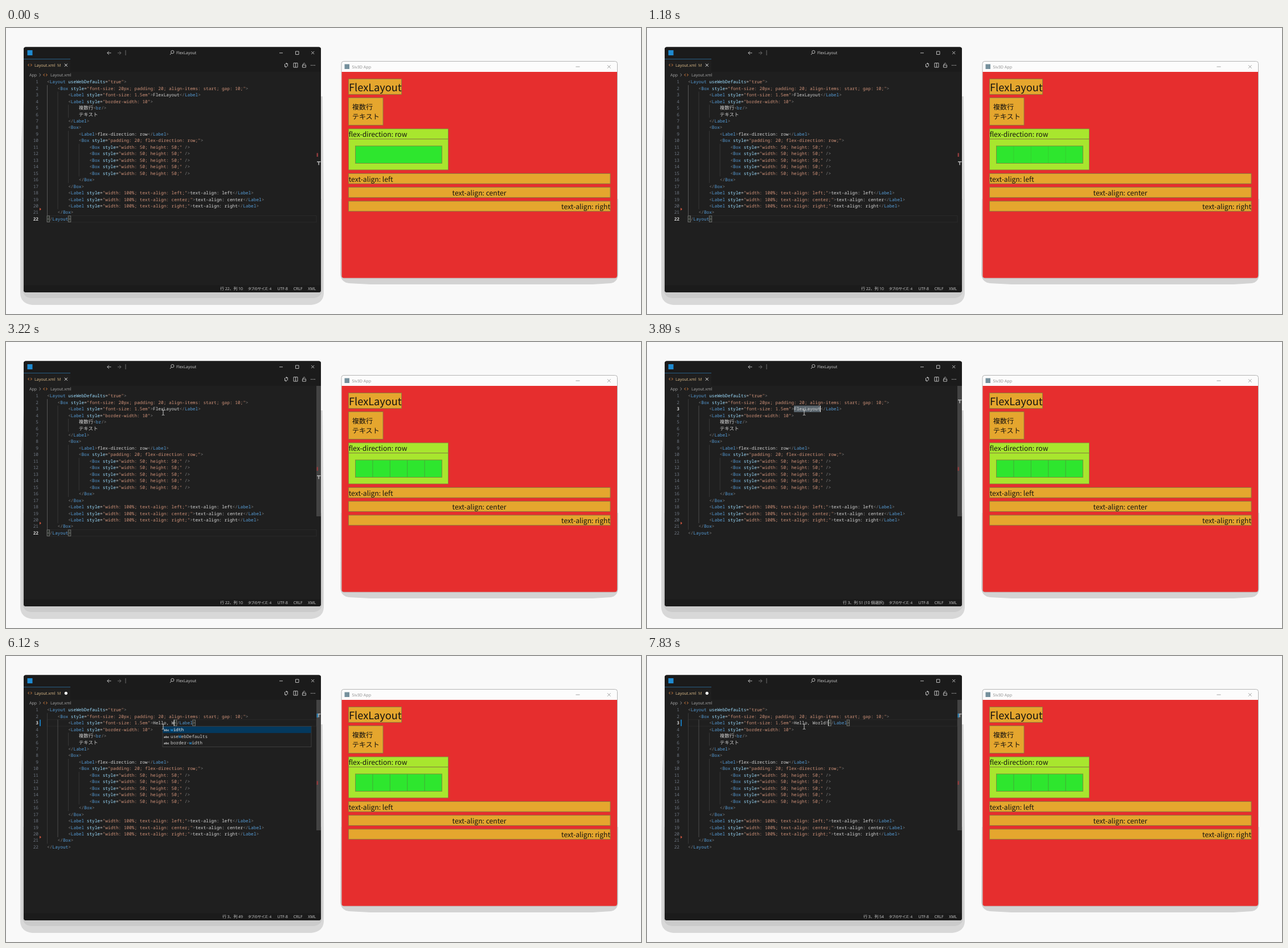
These frames come from a looping animation (1115 by 502 pixels, 8000 ms). An HTML page:

```html
<!DOCTYPE html>
<html lang="ja">
<head>
<meta charset="utf-8">
<title>FlexLayout</title>
<style>
html, body { margin: 0; width: 100%; height: 100%; overflow: hidden; background: #f9f9f9; }
svg { display: block; width: 1115px; height: 502px; }
text { white-space: pre; text-rendering: geometricPrecision; }
.code { font: 7.75px "Noto Sans Mono", monospace; fill: #ccc; }
.jp { font: 8.46px "Noto Sans CJK JP", "Noto Sans CJK", sans-serif; }
.ui { font: 7.1px "Open Sans", "Noto Sans CJK JP", sans-serif; fill: #ccc; }
.bar { font: 6.9px "Open Sans", "Noto Sans CJK JP", sans-serif; fill: #d0d0d0; }
.kana { font-size: 6.3px; font-feature-settings: "palt"; }
.app { font: 12.15px "Noto Sans CJK JP", "Noto Sans CJK", sans-serif; fill: #161310; }
.big { font-size: 18.2px; }
.icon { fill: none; stroke: #ccc; stroke-width: .9; }
</style>
</head>
<body>
<svg id="stage" viewBox="0 0 1115 502"></svg>
<script>
const LOOP = 8000, LEFT = 72, CH = 4.65, ROW = 11.46, TOP = 94.5;
const stage = document.getElementById('stage');

function el(name, attrs, parent = stage) {
  const node = document.createElementNS('http://www.w3.org/2000/svg', name);
  for (const k in attrs) node.setAttribute(k, attrs[k]);
  return parent.appendChild(node);
}
const group = () => el('g', {});
const rect = (x, y, x2, y2, fill, more, parent) =>
  el('rect', { x, y, width: x2 - x, height: y2 - y, fill, ...more }, parent);
const path = (d, more, parent) => el('path', { d, class: 'icon', ...more }, parent);
function text(x, y, str, cls, more, parent) {
  const node = el('text', { x, y, class: cls, ...more }, parent);
  node.textContent = str;
  return node;
}
const show = (node, on) => node.setAttribute('visibility', on ? 'visible' : 'hidden');
const colX = c => LEFT + c * CH;
const rowY = n => TOP + (n - 1) * ROW;

// Editor window
path('M31 120 L27 200 L25 330 V466 Q26 484 46 486 H536 Q557 484 558 466 V300 L556 120Z',
  { style: 'fill:#d8d8d8;stroke:none' });
path('M30 300 L28 455 Q29 473 44 474 H540 Q555 473 556 456 L554 300Z',
  { style: 'fill:#cbcbcb;stroke:none' });
rect(31, 33.5, 553, 464, '#1f1f1f', { rx: 4 });
path('M31 76.5 V37.5 Q31 33.5 35 33.5 H549 Q553 33.5 553 37.5 V76.5Z',
  { style: 'fill:#1b1b1b;stroke:none' });
rect(31, 54, 113, 77, '#1f1f1f');
rect(31, 54, 113, 54.8, '#2a6f9f');
path('M31 451.5 H553 V460 Q553 464 549 464 H35 Q31 464 31 460Z',
  { style: 'fill:#1b1b1b;stroke:none' });
rect(37.5, 39, 46.5, 48, '#1f8ad0');

path('M184.5 43.8 H177.8 M180.8 40.8 L177.8 43.8 L180.8 46.8');
path('M196 43.8 H202 M199 40.8 L202 43.8 L199 46.8 M210 39 V48', { style: 'stroke:#777' });
path('M294.9 42.1 A2.6 2.6 0 1 1 289.7 42.1 A2.6 2.6 0 1 1 294.9 42.1 M290.4 44 L288 47');
text(299, 46.4, 'FlexLayout', 'ui');
path('M480 43.8 H486 M508.5 41 H514 V46.5 H508.5Z M536.2 41 L541.2 46 M541.2 41 L536.2 46');

const tagIcon = (x, y) => path(
  `M${x - 1} ${y - 2} L${x - 3.5} ${y} L${x - 1} ${y + 2} M${x + 1} ${y - 2} L${x + 3.5} ${y} L${x + 1} ${y + 2}`,
  { style: 'stroke:#d9803f' });
tagIcon(42, 65);
text(50, 67.9, 'Layout.xml', 'ui', { style: 'fill:#e2c08d' });
text(90, 67.9, 'M', 'ui', { style: 'fill:#c5a878' });
const closeTab = path('M102.8 62.7 L107.8 67.7 M107.8 62.7 L102.8 67.7', { style: 'stroke:#fff' });
const dirtyDot = el('circle', { cx: 105.3, cy: 65.3, r: 2.6, fill: '#fff' });

path('M489.5 63 V68 H492 M494.5 67.5 V62.5 H491.5 M493 61 L491.2 62.5 L493 64 M491 66.5 L492.8 68 L491 69.5');
path('M505 61.5 H512 V69 H505Z M508.5 61.5 V69');
path('M520.5 65 H526.5 V69 H520.5Z M521.7 65 V63 Q523.5 60 525.4 63');
for (const x of [536, 539, 542]) el('circle', { cx: x, cy: 65.5, r: .75, fill: '#ccc' });

const crumb = { style: 'fill:#a9a9a9' };
text(41, 84.8, 'App', 'ui', crumb);
path('M58.5 80 L61 82.4 L58.5 84.8', { style: 'stroke:#999' });
tagIcon(69, 82.4);
text(78, 84.8, 'Layout.xml', 'ui', crumb);

const end = { 'text-anchor': 'end' };
const status = text(416, 460.3, '', 'bar', end);
text(466, 460.3, 'タブのサイズ: 4', 'bar kana', end);
text(495, 460.3, 'UTF-8', 'bar', end);
text(520.5, 460.3, 'CRLF', 'bar', end);
text(544, 460.3, 'XML', 'bar', end);

// Code
const item = '<Box style="width: 50; height: 50;" />';
const align = a => `<Label style="width: 100%; text-align: ${a};">text-align: ${a}</Label>`;
const head = '<Label style="font-size: 1.5em">';
const source = [
  [0, '<Layout useWebDefaults="true">'],
  [1, '<Box style="font-size: 20px; padding: 20; align-items: start; gap: 10;">'],
  [2, ''],
  [2, '<Label style="border-width: 10">'],
  [3, '複数行<br/>'],
  [3, 'テキスト'],
  [2, '</Label>'],
  [2, '<Box>'],
  [3, '<Label>flex-direction: row</Label>'],
  [3, '<Box style="padding: 20; flex-direction: row;">'],
  ...Array(5).fill([4, item]),
  [3, '</Box>'],
  [2, '</Box>'],
  [2, align('left')], [2, align('center')], [2, align('right')],
  [1, '</Box>'],
  [0, '</Layout>']
];
const TOKEN = /(<\/?|\/?>)|((?<=<\/?)\w+)|(\w+(?=="))|("[^"]*")|(=|\s+|[^<>=]+)/g;
const COLORS = ['#808080', '#569cd6', '#9cdcfe', '#ce9178', '#d4d4d4'];

function paint(node, line) {
  node.textContent = '';
  for (const m of line.matchAll(TOKEN)) {
    const span = el('tspan', { fill: COLORS[m.slice(1).findIndex(Boolean)] }, node);
    if (/[\u3040-\u9fff]/.test(m[0])) span.setAttribute('class', 'jp');
    span.textContent = m[0];
  }
}

const lineBox = rect(LEFT, 0, 545, ROW, 'none', { stroke: '#2b2b2b', 'stroke-width': .9 });
const guide = (indent, a, b) => rect(colX(indent * 4), rowY(a) - ROW / 2,
  colX(indent * 4) + .7, rowY(b) + ROW / 2, '#424242');
const outer = guide(0, 2, 21), inner = guide(1, 3, 20);
guide(2, 5, 6); guide(2, 9, 16); guide(3, 11, 15);

const selection = rect(colX(40), rowY(3) - 5.7, colX(50), rowY(3) + 5.7, '#5a656d');
const marks = [0, 1].map(() =>
  rect(0, 0, CH, ROW - .8, '#2b302b', { stroke: '#888', 'stroke-width': .7 }));
const numbers = [], lines = [];
source.forEach(([indent, str], i) => {
  const y = rowY(i + 1) + 2.75;
  numbers.push(text(57, y, i + 1, 'code', end));
  lines.push(text(colX(indent * 4), y, '', 'code'));
  paint(lines[i], str);
});
path('M59 315.5 L62 318 L59 320.5Z', { style: 'fill:#c8533d;stroke:none' });
const changed = rect(59, rowY(3) - 5.7, 61, rowY(3) + 5.7, '#1878b8');
const caret = rect(0, 0, 1, ROW - .4, '#e4e4e4');

// Scroll bar with overview marks
const slider = rect(545, 77, 553, 306, '#797979', { opacity: 0 });
rect(545.5, 219.5, 548, 226, '#8e3a3c');
const ruler = group();
rect(546, 0, 552.5, 1.6, '#b0b0b0', {}, ruler);
rect(548.4, 0, 550, 6.5, '#b0b0b0', {}, ruler);
const rulerEdit = rect(545.5, 101, 548, 108, '#2d7fb0');

// Suggestions
const popup = group();
rect(275, 123.5, 536, 159.5, '#202020', { stroke: '#454545', 'stroke-width': .8 }, popup);
rect(275.4, 123.8, 535.6, 135.2, '#04395e', {}, popup);
[['', 'w', 'idth'], ['use', 'W', 'ebDefaults'], ['border-', 'w', 'idth']].forEach((parts, i) => {
  const y = 132.2 + i * 11.5;
  text(277, y - .2, 'abc', 'ui', { style: 'font-size:5.4px;font-weight:700' }, popup);
  const node = text(289, y, '', 'code', {}, popup);
  parts.forEach((p, j) => {
    el('tspan', { fill: j === 1 ? '#2aaaff' : i ? '#ccc' : '#fff' }, node).textContent = p;
  });
});

const mouse = path('M-2.2 -4.5 Q0 -4.5 0 -3.4 Q0 -4.5 2.2 -4.5 M0 -3.4 V3.4 M-2.2 4.5 Q0 4.5 0 3.4 Q0 4.5 2.2 4.5',
  { style: 'stroke:#d8d8d8' });

// App window
path('M588 300 L587 432 Q588 446 602 448 L640 450 H1030 L1062 448 Q1074 446 1075 432 V300Z',
  { style: 'fill:#d3d3d3;stroke:none' });
rect(589, 58.5, 1073.5, 439, '#fcfcfc', { rx: 4, stroke: '#b4b4b4', 'stroke-width': 1 });
path('M589.5 77 H1073 V435 Q1073 438.7 1069 438.7 H593.5 Q589.5 438.7 589.5 435Z',
  { style: 'fill:#e62e2e;stroke:none' });
rect(594.5, 63.5, 603, 72, '#75909c');
text(607.5, 70.6, 'Siv3D App', 'ui', { style: 'fill:#888' });
path('M1000.5 68 H1007.5 M1056 65.2 L1061.6 70.8 M1061.6 65.2 L1056 70.8', { style: 'stroke:#999' });

const ORANGE = '#e5a62e', LIME = '#a8e62e', GREEN = '#2ee62e';
const block = (x, y, x2, y2, fill) =>
  rect(x, y, x2, y2, fill, { stroke: '#85803c', 'stroke-width': .9 });
block(601.5, 89.5, 694.5, 116.5, ORANGE);
text(602, 110.8, 'FlexLayout', 'app big');
block(601.5, 122.5, 662, 170.5, ORANGE);
text(607.7, 142.7, '複数行', 'app');
text(607.7, 160.3, 'テキスト', 'app');
block(601.5, 177, 776.5, 195, LIME);
block(601.5, 195, 776.5, 249, LIME);
text(601.7, 191.1, 'flex-direction: row', 'app');
block(613.5, 207, 765.5, 237.5, GREEN);
const dividers = path([1, 2, 3, 4].map(i => `M${613.5 + i * 30.4} 207.5 V237`).join(' '),
  { style: 'stroke:#55803c' });
[[255.5, 'left', 'start', 601.7], [279.7, 'center', 'middle', 831], [304, 'right', 'end', 1061]]
  .forEach(([y, name, anchor, x]) => {
    block(601.5, y, 1061, y + 17.7, ORANGE);
    text(x, y + 14.1, 'text-align: ' + name, 'app', { 'text-anchor': anchor });
  });

// Timing
const TYPED = 'Hello, World!';
const KEYS = [4160, 4630, 4970, 5100, 5240, 5510, 5720, 6120, 6330, 6680, 7220, 7350, 7830];
const CLICK = 3360, SELECT = 3620, POPUP = [6120, 6330];
const MOUSE = [[2180, 400, 465], [2520, 298, 320], [2900, 278, 132], [3010, 276, 124]];

function mouseAt(t) {
  const i = MOUSE.findIndex(k => k[0] > t);
  if (i < 0) return MOUSE[MOUSE.length - 1].slice(1);
  const [t0, x0, y0] = MOUSE[Math.max(i - 1, 0)], [t1, x1, y1] = MOUSE[i];
  const p = Math.max(0, (t - t0) / (t1 - t0));
  return [x0 + (x1 - x0) * p, y0 + (y1 - y0) * p];
}

let shown = null;
function draw(t) {
  const count = KEYS.filter(k => k <= t).length;
  const moved = t >= CLICK, selected = t >= SELECT && !count;
  const row = moved ? 3 : 22;
  const col = count ? 40 + count : selected ? 50 : moved ? 44 : 9;
  const word = count ? TYPED.slice(0, count) : 'FlexLayout';

  if (shown !== word) paint(lines[2], head + (shown = word) + '</Label>');
  status.textContent = `行 ${row}、列 ${col + 1}${selected ? ' (10 個選択)' : ''}`;
  numbers.forEach((n, i) => {
    n.style.fill = i + 1 === row ? '#d8d8d8' : '#6e7681';
    n.style.fontWeight = i + 1 === row ? 600 : 400;
  });

  const top = rowY(row) - ROW / 2;
  lineBox.setAttribute('y', top);
  show(lineBox, !selected);
  outer.setAttribute('fill', moved ? '#424242' : '#707070');
  inner.setAttribute('fill', moved ? '#606060' : '#424242');
  show(selection, selected);

  const pair = moved ? [col, col + 7] : [0, 8];
  marks.forEach((m, i) => {
    m.setAttribute('x', colX(pair[i]));
    m.setAttribute('y', top + .4);
    show(m, count || !moved);
  });
  caret.setAttribute('x', colX(col) - .5);
  caret.setAttribute('y', top + .2);
  show(caret, moved || Math.floor((t + 150) / 500) % 2);

  show(closeTab, !count);
  for (const n of [dirtyDot, changed, rulerEdit]) show(n, count);
  ruler.setAttribute('transform', `translate(0 ${moved ? 101 : 234})`);
  slider.setAttribute('opacity', .4 * Math.min(1, Math.max(0, (t - 2180) / 800)));
  show(popup, t >= POPUP[0] && t < POPUP[1]);
  dividers.setAttribute('opacity', t < 1180 ? 0 : t < 2180 ? .25 : .65);

  show(mouse, t >= MOUSE[0][0]);
  mouse.setAttribute('transform', `translate(${mouseAt(t)})`);
}

const start = performance.now();
function tick() {
  draw((performance.now() - start) % LOOP);
  requestAnimationFrame(tick);
}
tick();
</script>
</body>
</html>
```
